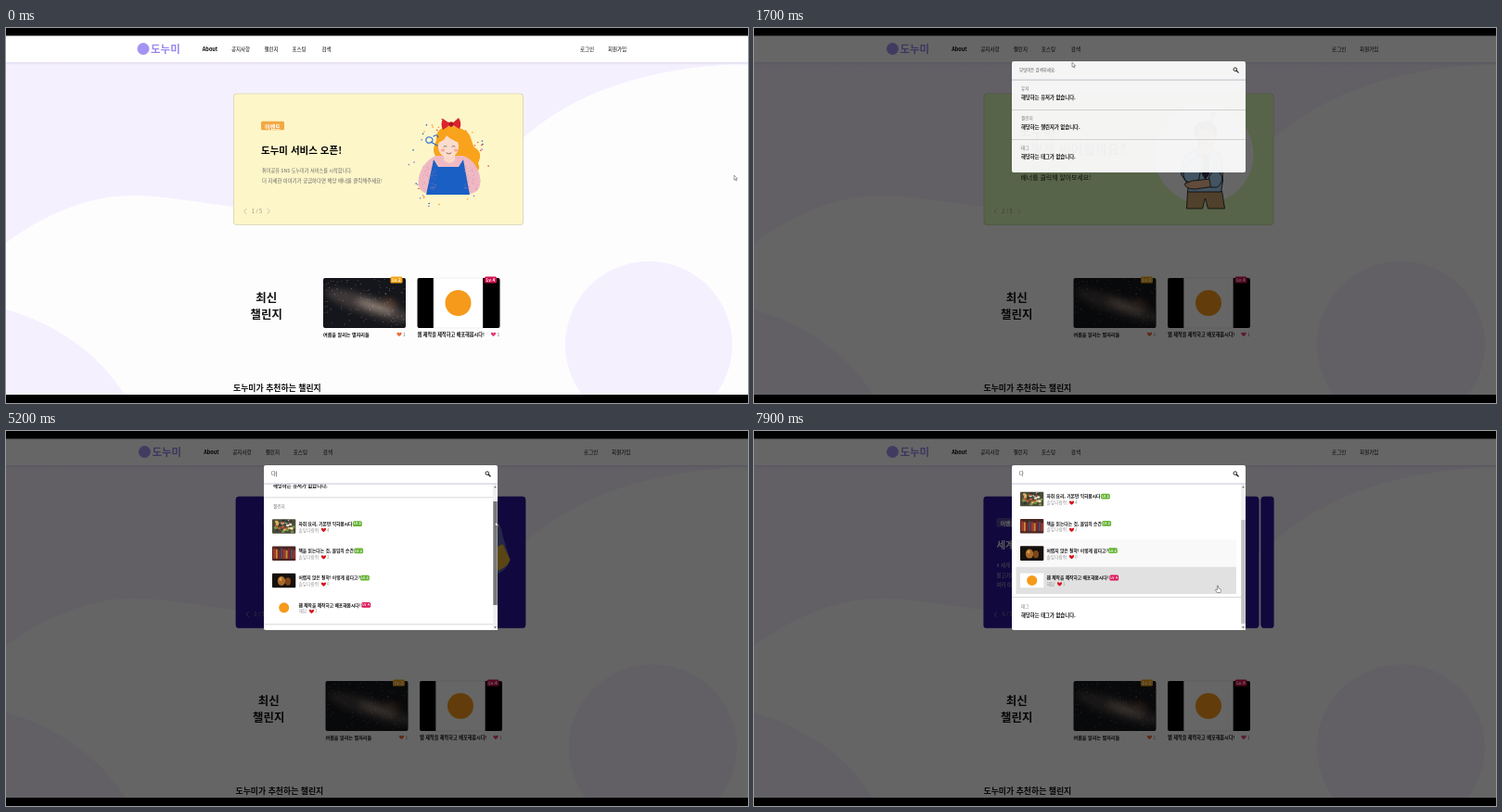
Recreate the animation shown at these times as an HTML page. Size 800 by 405 pixels, loop 8 s.

```html
<!DOCTYPE html>
<html lang="ko">
<head>
<meta charset="utf-8">
<style>
html, body { margin: 0; width: 100%; height: 100%; overflow: hidden; background: #000; }
svg { display: block; width: 100vw; height: 100vh; }
text { font-family: "Noto Sans CJK KR", "Noto Sans CJK", "Noto Sans", sans-serif; white-space: pre; }
</style>
</head>
<body>
<svg id="stage" viewBox="0 0 800 405" preserveAspectRatio="none"></svg>
<script>
const BRAND = '도누미';
const LOOP = 8000, OPEN = 1480, TYPED = 3500;

const text = (x, y, size, str, fill = '#111', weight = 400, anchor = 'start', more = '') =>
  `<text x="${x}" y="${y}" font-size="${size}" fill="${fill}" font-weight="${weight}" text-anchor="${anchor}" ${more}>${str}</text>`;
const rect = (x, y, w, h, fill, rx = 0, more = '') =>
  `<rect x="${x}" y="${y}" width="${w}" height="${h}" fill="${fill}" rx="${rx}" ${more}/>`;
const path = (d, fill, more = '') => `<path d="${d}" fill="${fill}" ${more}/>`;
const line = (d, stroke, w = 0.8) => path(d, 'none', `stroke="${stroke}" stroke-width="${w}" stroke-linecap="round" stroke-linejoin="round"`);
const oval = (x, y, rx, ry, fill, more = '') => `<ellipse cx="${x}" cy="${y}" rx="${rx}" ry="${ry}" fill="${fill}" ${more}/>`;
const group = (id, body, more = '') => `<g id="${id}" ${more}>${body}</g>`;
const repeat = (n, fn) => Array.from({ length: n }, (_, i) => fn(i)).join('');
const heart = (x, y, fill) =>
  path(`M${x} ${y + 2.2}C${x - 4.6} ${y - 0.8} ${x - 2} ${y - 3.6} ${x} ${y - 1.2}C${x + 2} ${y - 3.6} ${x + 4.6} ${y - 0.8} ${x} ${y + 2.2}Z`, fill);
const badge = (x, y, w, h, fill, label) =>
  rect(x, y, w, h, fill, 1.5) + text(x + w / 2, y + h - 1.6, h * 0.66, label, '#fff', 700, 'middle');

let seed = 7;
const rnd = () => (seed = (seed * 16807) % 2147483647) / 2147483647;

function backdrop() {
  const lilac = '#f5f0fe';
  return path('M0 37H800V38C690 43 615 68 556 120C470 195 350 205 245 193C200 188 160 178 115 182C70 188 30 210 0 232Z', lilac) +
    path('M0 304C50 318 100 350 128 397H0Z', lilac) + oval(693, 342, 90, 90, lilac);
}

function header() {
  const nav = [['About', 220, 700], ['공지사항', 253], ['챌린지', 286], ['포스팅', 316], ['검색', 345.5]];
  const item = ([s, x, w = 400]) => text(x, 24.6, 5.5, s, '#000', w, 'middle');
  return rect(0, 37, 800, 4, 'url(#shade)') + rect(0, 8, 800, 29, '#fff') +
    group('navL', oval(148, 22.5, 6.5, 6.5, '#a593f3') + text(156, 27, 11.5, BRAND, '#9a86f0', 900) + nav.map(item).join('')) +
    group('navR', [['로그인', 626.5], ['회원가입', 659]].map(item).join(''));
}

function girl() {
  const hues = ['#e8433f', '#f6a01a', '#2c62c8', '#a46bd0'];
  return repeat(38, i => {
    const a = rnd() * 6.283, r = 0.82 + rnd() * 0.25;
    return oval(476 + 42 * r * Math.cos(a), 149 + 49 * r * Math.sin(a), 0.9, 0.7, hues[i % 4]);
  }) +
    path('M464 121C462 106 481 103 491 109C502 112 501 122 505 129C514 134 511 141 509 146C513 154 506 158 499 156L484 150L463 138C459 132 462 127 464 121Z', '#f9a31c') +
    path('M446 173C441 161 450 144 463 138H493C506 142 515 160 510 173C504 182 492 180 488 172H467C462 181 449 180 446 173Z', '#efb9c4') +
    path('M461 142L466 150H488L493 142L500 180H453Z', '#1a5fc4') +
    path('M472 136H484V143Q478 149 472 143Z', '#fbd7c6') +
    oval(477, 128, 11, 12, '#fcdccd') +
    path('M465 124C468 112 485 108 490 124C482 122 477 118 475 116C473 121 469 123 465 124Z', '#f9a31c') +
    oval(471, 132, 2.2, 1.5, '#f5a9a0') + oval(485, 132, 2.2, 1.5, '#f5a9a0') +
    line('M472 128q1.5-1.5 3 0M481 128q1.5-1.5 3 0M475 135q3 2 5 0', '#5b3a2e', 0.7) +
    path('M480 104L471 98Q468 104 471 110ZM480 104L488 97Q492 103 489 109Z', '#d9232e') + oval(480, 104, 2.4, 2.8, '#b3141f') +
    line('M465 127L458 123M457 118a3.2 3.2 0 1 0 .1 6a3 3 0 1 0-.1-6M461 117q4-3 5 1', '#2567d8', 1.1) +
    repeat(60, () => oval(448 + rnd() * 16, 148 + rnd() * 27, 0.4, 0.4, '#c97f9a') + oval(494 + rnd() * 14, 148 + rnd() * 27, 0.4, 0.4, '#c97f9a'));
}

function thinker() {
  const ink = 'stroke="#222" stroke-width=".9" stroke-linejoin="round"';
  const shirt = '#a8d2f6', skin = '#f3bd93';
  return oval(482.5, 136.5, 53.5, 53.5, '#fff') + text(491.5, 101, 14.5, '?', '#222', 700, 'middle', 'transform="rotate(8 491 96)"') +
    path('M465 176H502L505 195H487L484 184L481 195H464Z', '#c8a26e', ink) +
    path('M460 142Q465 134 476 131H491Q500 134 502 142L503 165L501 177H465L466 170L458 158Z', shirt, ink) +
    path('M477 124H491V132L485 138L477 132Z', '#e5ab80', ink) +
    path('M484 136L488 139L488 158L484 163L481 158L482 140Z', '#2d3550', ink) +
    path('M475 113Q475 105 485 105Q495 106 495 114Q495 127 486 129Q477 127 475 113Z', skin, ink) +
    path('M473 117Q470 103 480 102Q490 98 496 107Q497 112 495 117L492 110Q484 112 478 108L475 117Z', '#6b4429', ink) +
    line('M478 113.5l4-.7M487 112.8l4 .7M479.5 116.5h1.5M488 116.5h1.5M485 116l-.8 4h1.8M483 124q2-1 4 0', '#222', 0.8) +
    path('M476 133Q476 127 481 126L487 127.5L486 131L483 134L481 141L474 140Z', skin, ink) +
    path('M474 139L482 140L477 164Q470 170 463 165Q459 160 461 150Z', shirt, ink) +
    path('M470 165L490 163L494 171L473 174Q462 174 462 168Z', skin, ink) +
    path('M488 161L495 150L502 160Q503 168 497 172L490 172Z', shirt, ink);
}

function slides() {
  const card = (i, fill, edge, body) =>
    `<g transform="translate(${i * 315} 0)">${rect(245.3, 70.8, 312.4, 142, fill, 3.5, `stroke="${edge}" stroke-width=".7"`)}${body}</g>`;
  const night = '#2b149a';
  return card(0, '#fdf6c9', '#c8c3a6',
      badge(275, 100.8, 25, 9.4, '#f2a943', '이벤트') + text(275, 135.6, 10.5, BRAND + ' 서비스 오픈!', '#000', 700) +
      text(276, 156, 5.15, `취미공유 SNS ${BRAND}가 서비스를 시작합니다.`, '#666') +
      text(276, 167.4, 5.4, '더 자세한 이야기가 궁금하다면 해당 배너를 클릭해주세요!', '#666') + girl()) +
    card(1, '#dcfcb6', '#b2c69a',
      text(283, 117.2, 14.4, BRAND, '#000', 700) + text(283, 136.4, 14.2, '어떻게 써야할까요?', '#000', 700) +
      text(285, 152.7, 6.95, BRAND + '의 모든 것', '#222') + text(285, 164.2, 6.9, '배너를 클릭해 알아보세요!', '#222') + thinker()) +
    card(2, night, night,
      badge(275, 94, 25, 9.4, '#55449f', '이벤트') + text(275, 127, 10.5, '세계 별자리 여행', '#ddd', 700) +
      ['# 세계 곳곳의 밤하늘', '물고기와 사자를 찾아', '여러 이야기를 만나요'].map((s, i) => text(275, 147 + i * 10.5, 5.4, s, '#bbb')).join('') +
      path('M518 95Q531 96 533 113L541 139Q538 153 518 157Z', '#5a62b0') + path('M518 130L533 122L541 139Q538 149 518 154Z', '#e2ae32')) +
    card(3, night, night, '');
}

function cards() {
  const blurred = (x, y, rx, ry, fill, opacity) => oval(x, y, rx, ry, fill, `opacity="${opacity}" filter="url(#blur)"`);
  const sky = `<g transform="rotate(18 392 300)">${blurred(392, 300, 50, 10, '#5d5350', 0.6)}${blurred(398, 299, 22, 4, '#c9b3a0', 0.6)}${blurred(412, 290, 9, 3, '#b0714a', 0.5)}</g>` +
    repeat(110, () => oval(342 + rnd() * 88, 271 + rnd() * 52, 0.35, 0.35, rnd() > 0.3 ? '#c9c9d4' : '#e8b58a'));
  return text(280.7, 296, 12.5, '최신', '#111', 700, 'middle') + text(280.7, 314, 12.4, '챌린지', '#111', 700, 'middle') +
    rect(342, 270, 89, 54, '#15161b', 2) + `<g clip-path="url(#skyBox)">${sky}</g>` +
    badge(414.5, 268.5, 13, 7, '#f2a516', 'Lv.2') +
    text(342, 332.5, 5.1, '여름을 알리는 별자리들', '#111', 700) + heart(424, 330.8, '#ee6a35') + text(428, 332.5, 5, '1', '#777') +
    rect(443.5, 270, 89, 54, '#000', 2) + rect(461, 270, 53, 54, '#fff', 0, 'stroke="#ddd" stroke-width=".4"') + oval(487.5, 297, 14, 14, '#f59a1b') +
    badge(516, 268.5, 13, 7, '#d3124f', 'Lv.4') +
    text(443.5, 332.5, 5.15, '웹 제작을 제작하고 배포해봅시다!', '#111', 700) + heart(525.5, 330.8, '#e8386c') + text(529.5, 332.5, 5, '1', '#777') +
    text(245, 392.3, 8.9, BRAND + '가 추천하는 챌린지', '#111', 700);
}

const PITCH = 29.3, MID = 120.5;
const rule = y => rect(278, y, 252, 0.8, '#cfcfcf');
const section = (y, name, body) => text(288, y, 4.6, name, '#777') + (body ? text(288, y + 10, 5.35, body, '#111', 700) : '');
const none = what => `해당하는 ${what} 없습니다.`;

function thumb(kind) {
  const box = fill => rect(287, -7.8, 25.3, 15.6, fill, 1);
  if (kind === 0) return box('#4d4a3a') + repeat(30, i =>
    oval(289 + rnd() * 21, -6 + rnd() * 12, 1.7, 1.3, ['#e9e2cf', '#6f9a4a', '#c65a33', '#2c3a33', '#d9b25c'][i % 5]));
  if (kind === 1) return box('#4a2620') + repeat(9, i => rect(288 + i * 2.7, -5.5 + (i % 3), 2.1, 11 - (i % 3), ['#b5332b', '#c98a3a', '#8a2430', '#46506b'][i % 4]));
  if (kind === 2) return box('#15100c') + oval(297, 0.5, 4.2, 5, '#a8692a') + oval(304, 1, 3, 4.2, '#7d4518') + oval(296, -1.5, 1.6, 2, '#d79a4d');
  return rect(287, -7.8, 25.3, 15.6, '#fff') + oval(299.7, 0, 5.5, 5.5, '#f59a1b');
}

function results() {
  const green = '#62b32f', calm = '솔잎다람쥐';
  const rows = [
    ['자취 요리, 기본만 익혀봅시다', 374, green, 'Lv.2', calm, 4],
    ['책을 읽는다는 것, 몰입의 순간', 375.3, green, 'Lv.2', calm, 2],
    ['어렵지 않은 철학! 이렇게 쉽다고?', 382, green, 'Lv.2', calm, 0],
    ['웹 제작을 제작하고 배포해봅시다!', 383.3, '#dd1558', 'Lv.4', '해담', 1]
  ];
  return section(68.3, '유저', none('유저가')) + rule(89) + section(100.4, '챌린지') +
    rows.map(([title, bx, color, level, user, likes], i) => {
      const hx = user.length > 2 ? 342.5 : 329.5;
      return `<g transform="translate(0 ${MID + i * PITCH})">` +
        rect(282.5, -PITCH / 2, 237.5, PITCH, '#e1e1e1', 0, 'class="hover" opacity="0"') + thumb(i) +
        text(315.5, -1.3, 4.75, title, '#111', 700) + badge(bx, -5.8, 9.8, 5.8, color, level) +
        text(315.5, 5.6, 4.7, user, '#999') + heart(hx, 4, '#d8161c') + text(hx + 3.6, 5.6, 4.7, likes, '#999') + '</g>';
    }).join('') + rule(226) + section(237.6, '태그', none('태그가'));
}

function panel() {
  const empty = section(68.3, '유저', none('유저가')) + rule(89) + section(100.3, '챌린지', none('챌린지가')) + rule(121) + section(132.3, '태그', none('태그가'));
  const bar = rect(525, 57.5, 5, 157.5, '#f1f1f1') + path('M526.2 61.2h2.6l-1.3-1.7zM526.2 211.3h2.6l-1.3 1.7z', '#555') +
    rect(525.3, 64, 4.4, 112, '#c1c1c1', 0, 'id="grip"');
  return rect(278, 37, 252, 120, '#fff', 2, 'id="sheet"') +
    group('empty', empty) +
    group('full', `<g clip-path="url(#listBox)">${group('list', results())}</g>${bar}`) +
    rect(278, 56.6, 252, 0.8, '#b9b5c6') +
    text(286, 48, 4.45, '무엇이든 검색하세요.', '#555', 400, 'start', 'id="hint"') +
    text(286, 48.4, 5.4, '', '#333', 400, 'start', 'id="query"') +
    rect(286, 49.4, 5, 0.5, '#333', 0, 'id="under"') + rect(291.2, 43.4, 0.5, 6, '#222', 0, 'id="caret"') +
    '<circle cx="518.8" cy="45.6" r="1.8" fill="none" stroke="#111" stroke-width=".9"/>' + line('M520.2 47l2 2', '#111', 1.1);
}

const pointers = {
  arrow: path('M0 0V5.2L1.2 4.1L2 6L2.9 5.6L2.1 3.8H3.6Z', '#fff', 'stroke="#444" stroke-width=".5"'),
  beam: line('M-.8-2.8H.8M0-2.8V2.8M-.8 2.8H.8', '#333', 0.6),
  hand: path('M-.6-3q.7-.7 1.2 0V0L3 .6Q3.7 1 3.4 2.4L2.8 4.5H-.8L-2.6 1.6Q-2.4.6-1.4 1.2L-.6 2Z', '#fff', 'stroke="#444" stroke-width=".5"')
};

const clip = (id, x, y, w, h, rx = 0) => `<clipPath id="${id}">${rect(x, y, w, h, '#000', rx)}</clipPath>`;
const pager = line('M259 195.4L256.6 198L259 200.6M282 195.4L284.4 198L282 200.6', '#a4a49a', 0.6) +
  text(270.5, 200, 5.5, '1 / 5', '#8c8c84', 400, 'middle', 'id="page"');

stage.innerHTML = `<defs>${clip('view', 244.9, 70.4, 313.2, 142.8, 3.8)}${clip('skyBox', 342, 270, 89, 54, 2)}${clip('listBox', 278, 57.4, 252, 157.6)}
  <filter id="blur" x="-50%" y="-150%" width="200%" height="400%"><feGaussianBlur stdDeviation="3.5"/></filter>
  <linearGradient id="shade" x2="0" y2="1"><stop stop-color="#dfd8ee"/><stop offset="1" stop-color="#f5f0fe" stop-opacity="0"/></linearGradient></defs>` +
  rect(0, 8, 800, 389, '#fdfdfe') + group('back', backdrop()) + header() +
  group('main', `<g clip-path="url(#view)">${group('track', slides())}</g>${pager}${cards()}`) +
  rect(0, 8, 800, 389, '#000', 0, 'id="dim"') + group('panel', panel()) +
  rect(0, 0, 800, 8.4, '#000') + rect(0, 396, 800, 9, '#000') +
  group('mouse', Object.keys(pointers).map(k => group(k, pointers[k])).join(''));

const $ = id => document.getElementById(id);
const set = (id, name, value) => $(id).setAttribute(name, value);
const move = (id, x, y = 0) => set(id, 'transform', `translate(${x} ${y})`);
const show = (id, on) => set(id, 'visibility', on ? 'inherit' : 'hidden');
const span = (t, from, length) => Math.min(1, Math.max(0, (t - from) / length));
const smooth = p => p * p * (3 - 2 * p);

// time, x, y, pointer
const route = [
  [0, 785, 159, 'arrow'], [150, 785, 159, 'arrow'], [800, 445, 55, 'arrow'], [1300, 346, 24, 'hand'], [1500, 346, 24, 'arrow'],
  [1700, 343, 37, 'arrow'], [2100, 338, 46, 'beam'], [4150, 338, 46, 'arrow'], [4850, 528, 87, 'arrow'], [5000, 528, 88, 'arrow'],
  [5200, 527.5, 98, 'arrow'], [5750, 526, 121, 'arrow'], [6050, 526, 121, 'arrow'], [6300, 539, 108, 'arrow'],
  [6560, 515, 80, 'hand'], [6900, 509, 88, 'hand'], [7400, 505, 118, 'hand'], [7780, 501, 147, 'hand'], [7900, 500, 170, 'hand'], [8000, 500, 170, 'hand']
];
const hovers = [6560, 6900, 7400, 7780, 9000];
const turns = [270, 4070, 7860];

function draw(t) {
  const open = t >= OPEN, p = span(t, OPEN, 250);
  // the page widens when its scrollbar goes away
  set('back', 'transform', `scale(${open ? 1.0063 : 1} 1)`);
  move('navL', open ? 1.4 : 0);
  move('navR', open ? 4.2 : 0);
  move('main', open ? 2.5 : 0);

  move('track', -315 * turns.reduce((sum, at) => sum + smooth(span(t, at, 300)), 0));
  $('page').textContent = `${1 + turns.filter(at => t >= at).length} / 5`;

  set('dim', 'opacity', 0.6 * span(t, OPEN, 215));
  show('panel', open);
  set('panel', 'opacity', Math.min(1, p * 1.06));
  move('panel', 0, -8 * (1 - p));

  const found = t >= TYPED, word = t < 2900 ? '' : t < 3400 ? 'ㄷ' : '다';
  set('sheet', 'height', found ? 178 : 120);
  show('empty', !found);
  show('full', found);
  show('hint', !word);
  $('query').textContent = word;
  show('under', word && t < 4150);
  show('caret', t > 4150 && t % 1000 < 500);

  const scroll = t < 5200 ? 17.5 * span(t, 5000, 200) : 17.5 + 29.5 * span(t, 5200, 550);
  move('list', 0, -scroll);
  set('grip', 'y', 64 + scroll * 0.68);
  set('grip', 'fill', t > 5000 && t < 5800 ? '#787878' : t > 4800 && t < 6200 ? '#a8a8a8' : '#c1c1c1');
  document.querySelectorAll('.hover').forEach((row, i) =>
    row.setAttribute('opacity', span(t, hovers[i], 110) * (1 - span(t, hovers[i + 1], 150))));

  const k = Math.max(0, route.findIndex(r => r[0] > t) - 1);
  const [t0, x0, y0, kind] = route[k], [t1, x1, y1] = route[k + 1];
  const q = smooth(span(t, t0, t1 - t0));
  move('mouse', x0 + (x1 - x0) * q, y0 + (y1 - y0) * q);
  for (const name in pointers) show(name, name === kind);
}

const start = performance.now();
function tick() {
  draw((performance.now() - start) % LOOP);
  requestAnimationFrame(tick);
}
tick();
</script>
</body>
</html>
```
